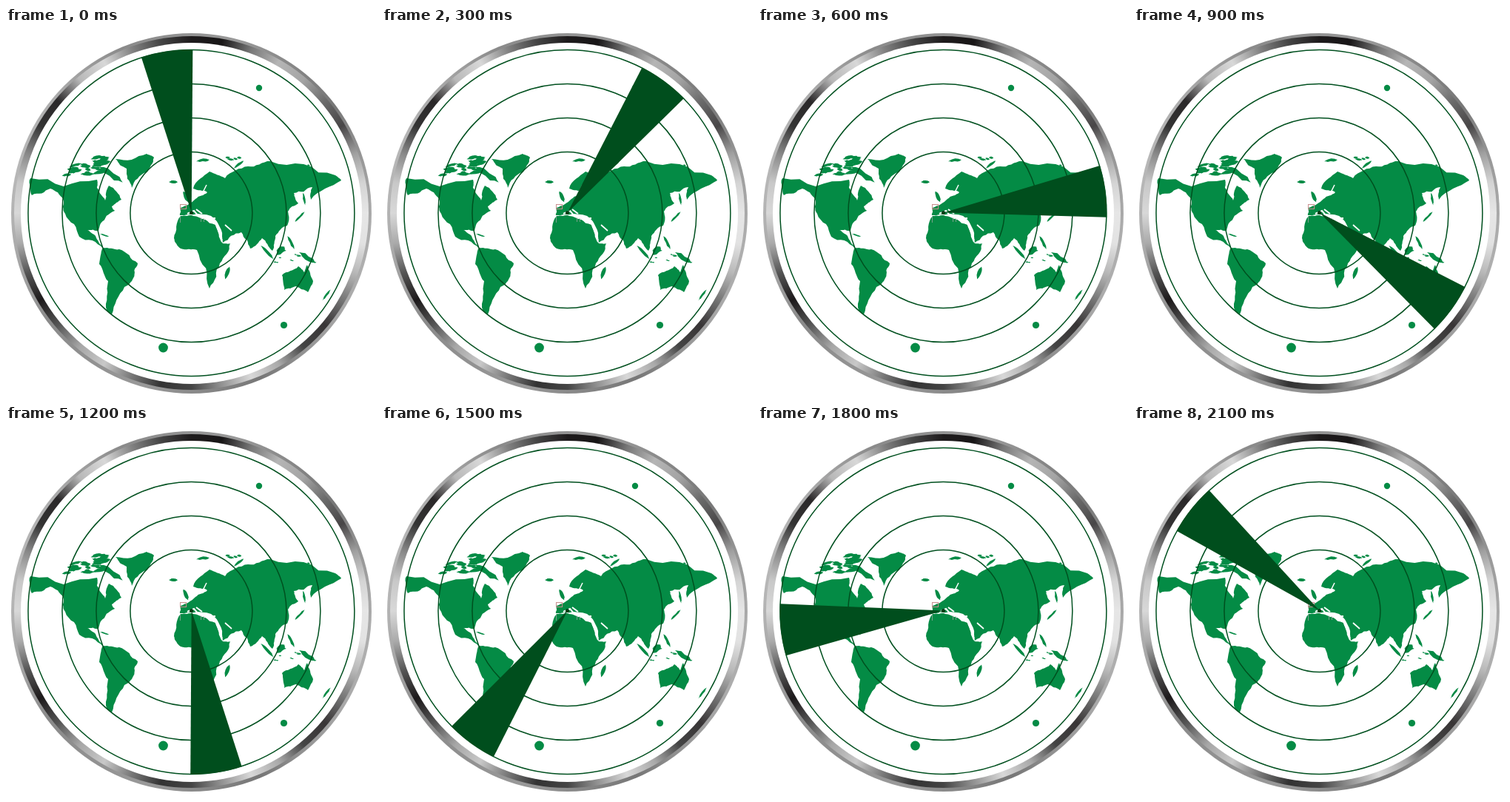
Write an HTML page that moves like this. It is 500x500 px and loops after 2.4 s.

```html
<!DOCTYPE html>
<html>
<head>
<meta charset="utf-8">
<title>Radar</title>
<style>
html, body { margin: 0; width: 100%; height: 100%; overflow: hidden; background: #fff; }
body { position: relative; }
div { position: absolute; border-radius: 50%; }
#rim { inset: 7px 6px 6.5px 7px;
  background: linear-gradient(105deg, #d2d2d2, #8a8a8a, #999, #777, #d0d0d0); }
#bezel { inset: 11px 10.5px 11px 10.5px;
  background: conic-gradient(#1e1b1c, #181617, #777, #b5b5b5, #a4a4a4, #6b6b6b, #484647, #a0a0a0, #d4d4d4,
    #e6e6e6, #e2e2e2, #b8b8b8, #747474, #383536, #444, #aaa, #d8d8d8, #929292,
    #444, #333, #777, #c8c8c8, #a6a6a6, #555, #1d1a1b, #555, #aaa,
    #d8d8d8, #c8c8c8, #888, #333, #2a2829, #b8b8b8, #d8d8d8, #828282, #444, #1e1b1c); }
#face { inset: 20px 19px 19.5px 20px; background: #fff; }
svg { position: absolute; left: 0; top: 0; }
</style>
</head>
<body>
<div id="rim"></div>
<div id="bezel"></div>
<div id="face"></div>
<svg width="500" height="500" viewBox="0 0 500 500">
  <g id="map" fill="#048b45"></g>
  <g fill="none" stroke="#fff" stroke-width="1.7">
    <path d="M283 264L292 287M296 266L305 274"/>
    <path d="M245 251L254 247L260 254M257 245L265 251M268 258L283 257" stroke-width="2"/>
    <path d="M256 224L266 222L271 212" stroke-width="1.5"/>
  </g>
  <rect x="235.5" y="238.5" width="8" height="6" fill="none" stroke="#c98f8f"/>
  <path d="M235.5 255v8M263.5 256v6M267.5 257v5" stroke="#aaa" stroke-width=".7"/>
  <g id="rings" fill="none" stroke="#00501f" stroke-width="1.5"></g>
  <g fill="#048b45">
    <circle cx="342" cy="81" r="4.2"/>
    <circle cx="375.5" cy="401.5" r="4.6"/>
    <circle cx="212.5" cy="432" r="6.4"/>
  </g>
  <path id="beam" fill="#004e1d"/>
  <circle cx="250.5" cy="249.5" r="2.5" fill="#003c15"/>
</svg>
<script>
const $ = id => document.getElementById(id);

function add(parent, tag, attrs) {
  const el = document.createElementNS('http://www.w3.org/2000/svg', tag);
  for (const key in attrs) el.setAttribute(key, attrs[key]);
  parent.append(el);
}

let seed = 7;
function random() {
  seed = seed * 16807 % 2147483647;
  return seed / 2147483647;
}

// Roughens an edge by shifting its midpoint sideways, again and again.
function edge([ax, ay], [bx, by], depth) {
  if (!depth) return [[ax, ay]];
  const shift = (random() - 0.5) * 0.22;
  const mid = [(ax + bx) / 2 + (by - ay) * shift, (ay + by) / 2 - (bx - ax) * shift];
  return [...edge([ax, ay], mid, depth - 1), ...edge(mid, [bx, by], depth - 1)];
}

function land(corners, depth) {
  const points = corners.flatMap((p, i) => edge(p, corners[(i + 1) % corners.length], depth));
  add($('map'), 'polygon', {points: points.join(' ')});
}

const continents = [
  '33,203 123,205 123,216 134,233 139,213 156,232 143,241 147,247 128,264 125,274 110,273 121,281 131,298 99,282 80,251 77,231 60,217 35,226',
  '131,297 153,299 178,318 172,338 160,350 143,387 137,383 138,342 126,319',
  '148,177 190,170 200,175 190,195 170,216 163,190',
  '235,253 236,243 256,231 272,222 253,217 275,194 296,203 327,187 357,180 445,199 453,206 412,232 414,215 389,223 395,237 381,248 380,267 364,281 360,301 346,284 330,298 318,276 293,290 282,258',
  '236,254 253,254 283,266 293,291 303,291 289,318 275,352 258,300 236,298 227,284',
  '373,334 395,322 403,330 407,320 415,342 408,357 392,349 376,354'
];
for (const shape of continents) land(shape.split(' ').map(p => p.split(',').map(Number)), 3);

function island(x, y, length, width, deg) {
  const a = deg * Math.PI / 180, dx = Math.cos(a) / 2, dy = Math.sin(a) / 2;
  const at = (u, v) => [x + u * length * dx - v * width * dy, y + u * length * dy + v * width * dx];
  land([at(-1, 0), at(-0.4, -1), at(0.6, -0.8), at(1, 0.1), at(0.4, 1), at(-0.5, 0.7)], 1);
}

// x, y, length, width, tilt
[
  [142, 198, 38, 9, 33], [226, 208, 12, 4, 0], [243, 228, 16, 5, 65], [266, 179, 18, 4, -8],
  [314, 185, 18, 3, -38], [299, 331, 18, 5, -72], [397, 255, 19, 3, -48], [403, 231, 17, 2.5, 80],
  [353, 303, 25, 4, 46], [371, 301, 15, 9, -50], [385, 290, 20, 4, 62], [407, 310, 26, 7, 32],
  [433, 361, 19, 3, -54], [133, 280, 13, 2, 18]
].forEach(i => island(...i));

function scatter(count, x, y, w, h, size) {
  for (let i = 0; i < count; i++)
    island(x + w * random(), y + h * random(), size * (0.5 + random()), size * 0.3, 40 * (random() - 0.5));
}
scatter(20, 80, 185, 48, 14, 13);
scatter(10, 103, 173, 38, 11, 15);
scatter(9, 362, 300, 66, 18, 5);
scatter(4, 296, 175, 20, 3, 9);
scatter(3, 397, 185, 12, 2, 7);

for (const r of [220.5, 174.5, 128.5, 82.5])
  add($('rings'), 'circle', {cx: 250.4, cy: 250, r});

// Leading edge of the beam in degrees clockwise from the top.
const heads = [0.5, 45.5, 91.5, 135.2, 180.3, 225.1, 272.5, 317.6];
const spread = 18.3, radius = 221, stepMs = 300;

function rimPoint(deg) {
  const a = deg * Math.PI / 180;
  return `${250.4 + radius * Math.sin(a)} ${250 - radius * Math.cos(a)}`;
}

function draw() {
  const head = heads[Math.floor(performance.now() / stepMs) % heads.length];
  $('beam').setAttribute('d',
    `M250.7 249.5L${rimPoint(head - spread)}A${radius} ${radius} 0 0 1 ${rimPoint(head)}Z`);
  requestAnimationFrame(draw);
}
draw();
</script>
</body>
</html>
```
